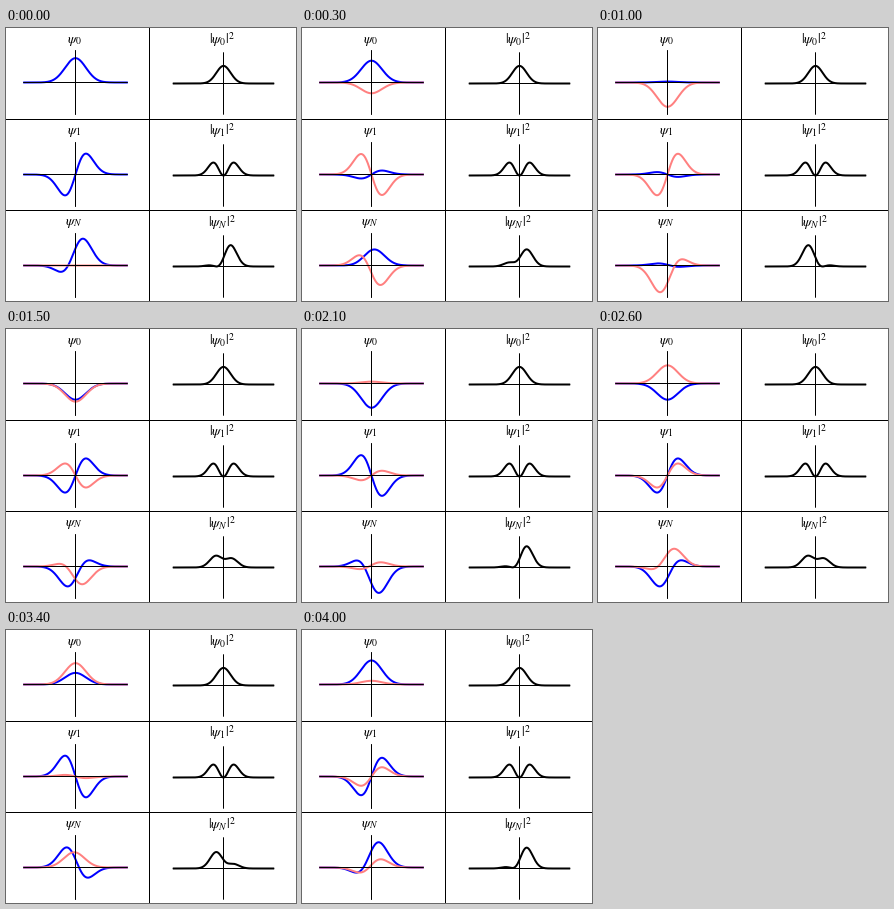
A matplotlib script that plays this animation: 290 by 273 pixels, repeating every 4100 ms.

```python
import numpy as np
import matplotlib.pyplot as plt
from matplotlib.animation import FuncAnimation

W, H, DPI = 290, 273, 100
PX = 72 / DPI            # one pixel in points
FRAMES, STEP_MS = 41, 100
ROW = 91                 # height of a grid row
BLUE, PINK = "#0000ff", "#ff8080"

plt.rcParams["mathtext.fontset"] = "stix"

fig = plt.figure(figsize=(W / DPI, H / DPI), dpi=DPI, facecolor="white")
ax = fig.add_axes([0, 0, 1, 1])
ax.set_xlim(0, W)
ax.set_ylim(H, 0)
ax.axis("off")

x = np.linspace(-5, 5, 401)
psi0 = np.pi ** -0.25 * np.exp(-x ** 2 / 2)
psi1 = np.sqrt(2) * x * psi0


def line(xs, ys, color="black", width=1.0, z=3):
    return ax.plot(xs, ys, color=color, lw=width * PX, zorder=z,
                   solid_capstyle="butt", snap=False)[0]


class Panel:
    """A pair of axes with a label and one or more curves."""

    def __init__(self, cx, cy, half, unit, text, base, colors):
        self.cy, self.unit = cy, unit
        line([cx - half, cx + half], [cy, cy], z=4)
        line([cx, cx], [cy - unit, cy + unit], z=4)
        ax.text(cx - 1.5, base, text, fontsize=14 * PX, ha="center",
                va="baseline")
        xs = cx + x * half / 5
        self.curves = [line(xs, x * np.nan, c, 2) for c in colors]

    def show(self, *values):
        for curve, v in zip(self.curves, values):
            curve.set_ydata(self.cy - self.unit * v)


waves, densities = [], []
for i, sub in enumerate("01N"):
    cy, base = (54.5, 146.5, 237.5)[i], (15, 106, 197.5)[i]
    waves.append(Panel(69.5, cy, 52.3, 32.4, rf"$\psi_{sub}$", base,
                       (BLUE, PINK)))
    densities.append(Panel(217.5, cy + 1, 50.7, 31.2,
                           rf"$|\psi_{sub}|^2$", base + 1, ("black",)))

line([143.5, 143.5], [0, H])
for k in (1, 2):
    line([0, W], [k * ROW + 0.5] * 2)


def nonzero(v):
    """A part that vanishes everywhere is not drawn."""
    return v if v.any() else v * np.nan


def draw(k):
    t = 4 * np.pi * k / FRAMES
    a = psi0 * np.exp(-0.5j * t)
    b = psi1 * np.exp(-1.5j * t)
    mix = (a + b) / np.sqrt(2)
    for wave, s in zip(waves, (a, b)):
        wave.show(s.real, nonzero(s.imag))
    waves[2].show(mix.real, mix.imag)
    for density, s in zip(densities, (a, b, mix)):
        density.show(np.abs(s) ** 2)
    return [c for p in waves + densities for c in p.curves]


anim = FuncAnimation(fig, draw, frames=FRAMES, interval=STEP_MS,
                     repeat=True, repeat_delay=0)
plt.show()
```
